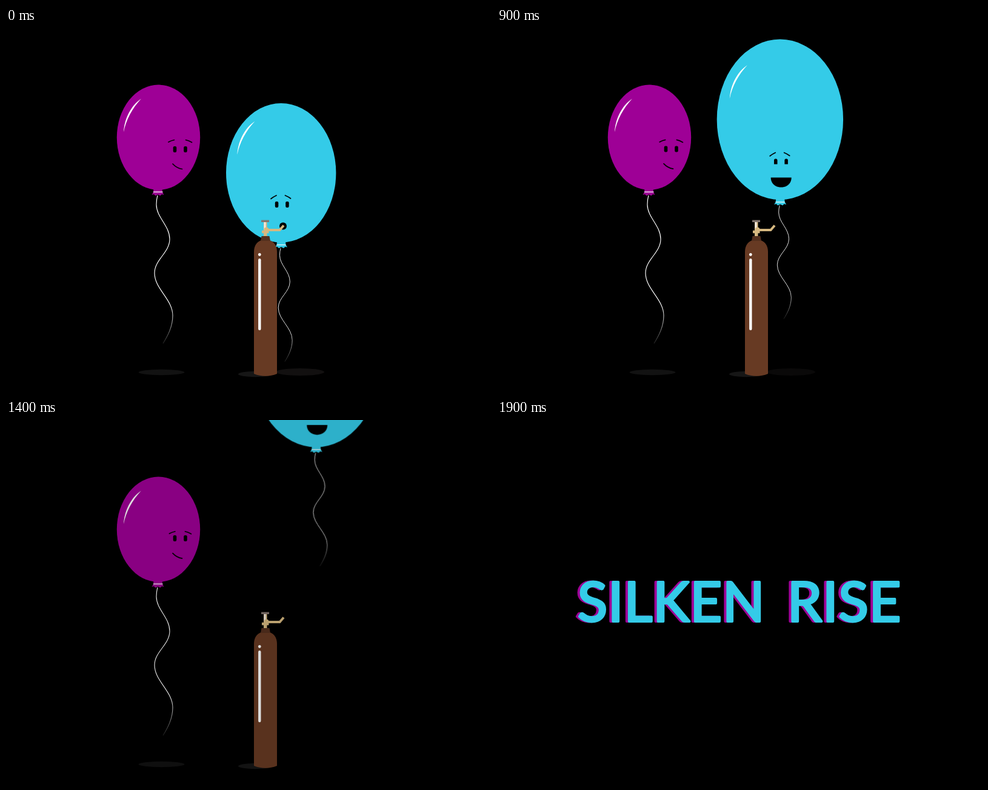
These frames come from a looping animation (800 px wide and 600 px high, 5 s). An HTML page:

```html
<!DOCTYPE html>
<html lang="en">
<head>
<meta charset="utf-8">
<title>Balloons</title>
<style>
  html, body { margin: 0; width: 100%; height: 100%; overflow: hidden; background: #000; }
  svg { display: block; width: 100vw; height: 100vh; }
  .brow { fill: none; stroke: #000; stroke-width: 1.7; stroke-linecap: round; }
  #title text {
    font: 400 91px Lato, sans-serif;
    letter-spacing: 1px;
    word-spacing: 12px;
    text-anchor: middle;
    stroke-width: 4;
    stroke-linejoin: round;
  }
</style>
</head>
<body>
<svg viewBox="0 0 800 600">
  <defs>
    <linearGradient id="fade" gradientUnits="userSpaceOnUse" x1="0" y1="180" x2="0" y2="246">
      <stop offset="0" stop-color="#fff"/>
      <stop offset="1" stop-color="#fff" stop-opacity=".1"/>
    </linearGradient>
    <path id="knot" d="M-7-3H7L7.5 4 10 8.500 6.500 7.500 4 10 0 8 -4 10 -6.500 7.500 -10 8.500 -7.500 4Z"/>
    <path id="string" fill="none" stroke="url(#fade)" stroke-width="1.150"
      d="M0 0Q-2 7-2 15C-2 36 20 50 20 72C20 94-5 106-5 128C-5 154 25 171 25 198C25 216 17 231 9 244"/>
    <path id="shine" fill="#fff" d="M0 0C1-20 11-43 29-55C14-39 4-20 0 0Z"/>
  </defs>
  <rect width="800" height="600"/>

  <g id="scene">
    <ellipse cx="256.500" cy="567.500" rx="38" ry="4.700" fill="#121212"/>
    <ellipse id="shadow" cx="485" cy="567" rx="40" ry="6" fill="#121010"/>
    <ellipse cx="411" cy="570.500" rx="28" ry="4.700" fill="#161616"/>

    <g fill="#9e0096">
      <use href="#string" x="250" y="276"/>
      <ellipse cx="251.500" cy="180.300" rx="68.700" ry="86.700"/>
      <use href="#knot" x="250.500" y="266.500"/>
      <path d="M243 270.300H258.500" stroke="#fff" stroke-width="1.300"/>
      <use href="#shine" x="194" y="171.500"/>
    </g>
    <g id="eyes">
      <rect x="275.700" y="195" width="5.600" height="10" rx="2.200"/>
      <rect x="293.200" y="195" width="5.600" height="10" rx="2.200"/>
    </g>
    <path id="browL" class="brow" d="M268 188Q272.500 185.500 277.500 184.500"/>
    <path id="browR" class="brow" d="M296.500 184.500Q301.500 185.500 306.500 188.500"/>
    <path id="grin" class="brow" d="M275 224Q281.500 231 290.500 232.500"/>

    <g id="blue" fill="#34cbe8">
      <use href="#string" transform="translate(453 363) scale(.766)"/>
      <ellipse id="body" cx="453.700"/>
      <use href="#knot" x="454" y="353"/>
      <path d="M446.500 357.500H461.500" stroke="#fff" stroke-width="1.200"/>
      <use id="gleam" href="#shine"/>
      <path class="brow" d="M437 281.500Q441 278.300 446 276"/>
      <path class="brow" d="M460.500 276Q465.500 278 469.500 281"/>
      <g id="blowing" fill="#000">
        <rect x="443.800" y="286" width="5.500" height="10" rx="2.200"/>
        <rect x="461.200" y="286" width="5.500" height="10" rx="2.200"/>
        <circle cx="457" cy="326.500" r="6"/>
      </g>
      <g id="happy" fill="#000">
        <path d="M443.800 295V288.500Q443.800 286 446.500 286T449.300 288.500V295Z"/>
        <path d="M461.200 295V288.500Q461.200 286 464 286T466.700 288.500V295Z"/>
        <path d="M438.500 317H472.500C472.500 338.500 438.500 338.500 438.500 317Z"/>
      </g>
    </g>

    <path d="M425 343V320H430.500V343Z" fill="#d6b880"/>
    <path d="M427 320V333" stroke="#f2e9e2" stroke-width="3"/>
    <path d="M421 318.300H434" stroke="#82756f" stroke-width="3.400"/>
    <path d="M422 336H433.500" stroke="#d6b880" stroke-width="4.500"/>
    <circle cx="429.500" cy="332.500" r="4" fill="#d6b880"/>
    <path d="M429 333H451.500L458 325.500" fill="none" stroke="#d6b880" stroke-width="3.800"/>
    <path d="M409 570V369C409 359 414 352 421 350H435C442 352 447 359 447 369V570Q428 577.500 409 570Z" fill="#673a23"/>
    <path d="M421.500 343H434.500L436 351H420Z" fill="#54301e"/>
    <circle cx="418.300" cy="373.500" r="2.400" fill="#fff"/>
    <path d="M418.300 382.300V496" stroke="#fff" stroke-width="4.400" stroke-linecap="round"/>
  </g>

  <g id="title">
    <text x="396" y="332" fill="#9e0096" stroke="#9e0096">SILKEN RISE</text>
    <text x="400" y="332" fill="#34cbe8" stroke="#34cbe8">SILKEN RISE</text>
  </g>
</svg>
<script>
  const LOOP = 5000, STEP = 100, LIFT = 752, TITLE = 1800;
  const $ = id => document.getElementById(id);
  const clamp = v => Math.max(0, Math.min(1, v));
  const smooth = v => { v = clamp(v); return v * v * (3 - 2 * v); };
  const set = (id, attrs) => {
    for (const k in attrs) $(id).setAttribute(k, attrs[k]);
  };
  const move = (id, x, y) => set(id, { transform: `translate(${x} ${y})` });
  const show = (id, on) => set(id, { visibility: on ? "visible" : "hidden" });

  function draw(t) {
    // inflate upward from the fixed knot
    const grow = 0.05 * clamp(t / 500) + 0.95 * smooth((t - 525) / 275);
    const rx = 90.7 + 13.5 * grow, ry = 114.7 + 17.5 * grow;
    const cy = 353.5 - ry;
    set("body", { cy, rx, ry });
    move("gleam", 453.7 - 0.797 * rx, cy - 0.262 * ry);

    // released: steady drift up and to the right
    const air = Math.max(0, t - LIFT);
    move("blue", 0.089 * air, -0.4765 * air);
    show("blowing", t < LIFT);
    show("happy", t >= LIFT);
    set("shadow", { opacity: 1 - clamp((t - 700) / 500) });

    // the friend looks up
    const look = smooth((t - 750) / 1000);
    move("eyes", 0, -7 * look);
    move("browL", 2 * look, -look);
    move("browR", -1.5 * look, -look);
    move("grin", 0, -6 * look);

    set("scene", { opacity: clamp((1806 - t) / 466) });
    show("title", t >= TITLE);
  }

  const start = performance.now();
  function tick() {
    const t = (performance.now() - start) % LOOP;
    draw(Math.floor(t / STEP) * STEP);
    requestAnimationFrame(tick);
  }
  draw(0);
  requestAnimationFrame(tick);
</script>
</body>
</html>
```
